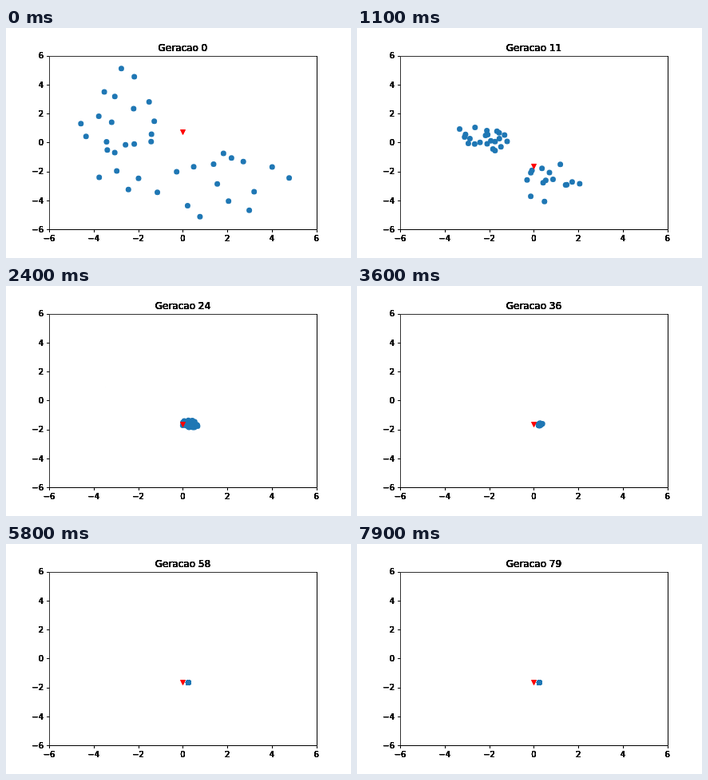
An HTML page for the animation above (8000 ms loop, 432 px wide and 288 px high).

```html
<!DOCTYPE html>
<html lang="pt">
<head>
<meta charset="utf-8">
<style>
  html, body { margin: 0; width: 100%; height: 100%; overflow: hidden; background: #fff; }
  svg { display: block; width: 432px; height: 288px; }
  text { font: 10px "DejaVu Sans", sans-serif; }
  .title { font-size: 12px; text-anchor: middle; }
</style>
</head>
<body>
<svg viewBox="0 0 432 288">
  <defs><clipPath id="plot"><rect x="54" y="34.56" width="334.8" height="217.44"/></clipPath></defs>
  <g clip-path="url(#plot)">
    <g id="dots" fill="#1f77b4"></g>
    <path id="marker" d="M-3-3H3L0 3Z" fill="red" stroke="red" stroke-linejoin="round"/>
  </g>
  <g id="axes"></g>
</svg>
<script>
const STEP = 100, GENERATIONS = 80, POPULATION = 37, TEXT_PASSES = 10;
const $ = id => document.getElementById(id);

function add(parent, tag, attrs, content = '') {
  const el = document.createElementNS('http://www.w3.org/2000/svg', tag);
  for (const key in attrs) el.setAttribute(key, attrs[key]);
  el.textContent = content;
  return parent.appendChild(el);
}

// Stacked passes darken the antialiased edges of the glyphs.
const addText = (attrs, content) =>
  Array.from({ length: TEXT_PASSES }, () => add($('axes'), 'text', attrs, content));

const line = (d, stroke = '#000') => add($('axes'), 'path', { d, stroke, fill: 'none' });
const snap = v => Math.floor(v + 0.5) + 0.5;

line('M54.5 253V35.5H390', '#333');
line('M54 252.5H389.5V35');
for (let v = -6; v <= 6; v += 2) {
  const px = 221.4 + 27.9 * v, py = 143.28 - 18.12 * v;
  const label = String(v).replace('-', '\u2212');
  line(`M${snap(px)} 252.5v3.5M54.5 ${snap(py)}h-3.5`);
  addText({ x: px, y: 267, 'text-anchor': 'middle' }, label);
  addText({ x: 47, y: py + 3.8, 'text-anchor': 'end' }, label);
}
const titles = addText({ class: 'title', x: 221.4, y: 28.56 });

function random(a, b) {
  const s = Math.sin(a * 127.1 + b * 311.7 + 5.3) * 43758.5453;
  return s - Math.floor(s);
}

// Each valley is an ellipse that shrinks: generation, centre x, y, radii x, y.
const localValley = [[0, 140, 133, 54, 88], [7, 147, 138, 42, 21], [16, 182, 138, 12, 11], [24, 190, 142, 8, 8]];
const bestValley = [[0, 272, 192, 88, 56], [7, 243, 195, 48, 26], [16, 236, 173, 20, 9],
  [24, 229.5, 172.8, 9, 5], [36, 228.4, 173.4, 1, 1], [45, 228.4, 173.4, 0, 0]];

function ellipseAt(valley, gen) {
  const next = valley.findIndex(([g]) => g > gen);
  if (next < 0) return valley[valley.length - 1].slice(1);
  const from = valley[next - 1], to = valley[next];
  const k = (gen - from[0]) / (to[0] - from[0]);
  return from.slice(1).map((v, n) => v + (to[n + 1] - v) * k);
}

// Individuals sit still until they are replaced; the first 22 start in the
// local valley and leave it one after another.
function position(i, gen) {
  const leave = i < 22 ? Math.ceil(23 - i / 2) : 0;
  let born = gen;
  while (born > 0 && born !== leave && random(i, born) > 0.45) born--;
  const [x, y, rx, ry] = ellipseAt(born < leave ? localValley : bestValley, born);
  const angle = 2.4 * i + born, r = Math.sqrt(random(i + 0.5, born));
  return [x + rx * r * Math.cos(angle), y + ry * r * Math.sin(angle)];
}

const dots = Array.from({ length: POPULATION }, () => add($('dots'), 'circle', { r: 3.5 }));

function draw(gen) {
  titles.forEach(t => t.textContent = `Geracao ${gen}`);
  dots.forEach((dot, i) => {
    const [x, y] = position(i, gen);
    dot.setAttribute('cx', x);
    dot.setAttribute('cy', y);
  });
  const markerY = 173.5 - 43 * Math.exp(-gen / 1.8);
  $('marker').setAttribute('transform', `translate(221.5 ${markerY})`);
}

const start = performance.now();
function tick() {
  draw(Math.floor((performance.now() - start) / STEP) % GENERATIONS);
  requestAnimationFrame(tick);
}
tick();
</script>
</body>
</html>
```
